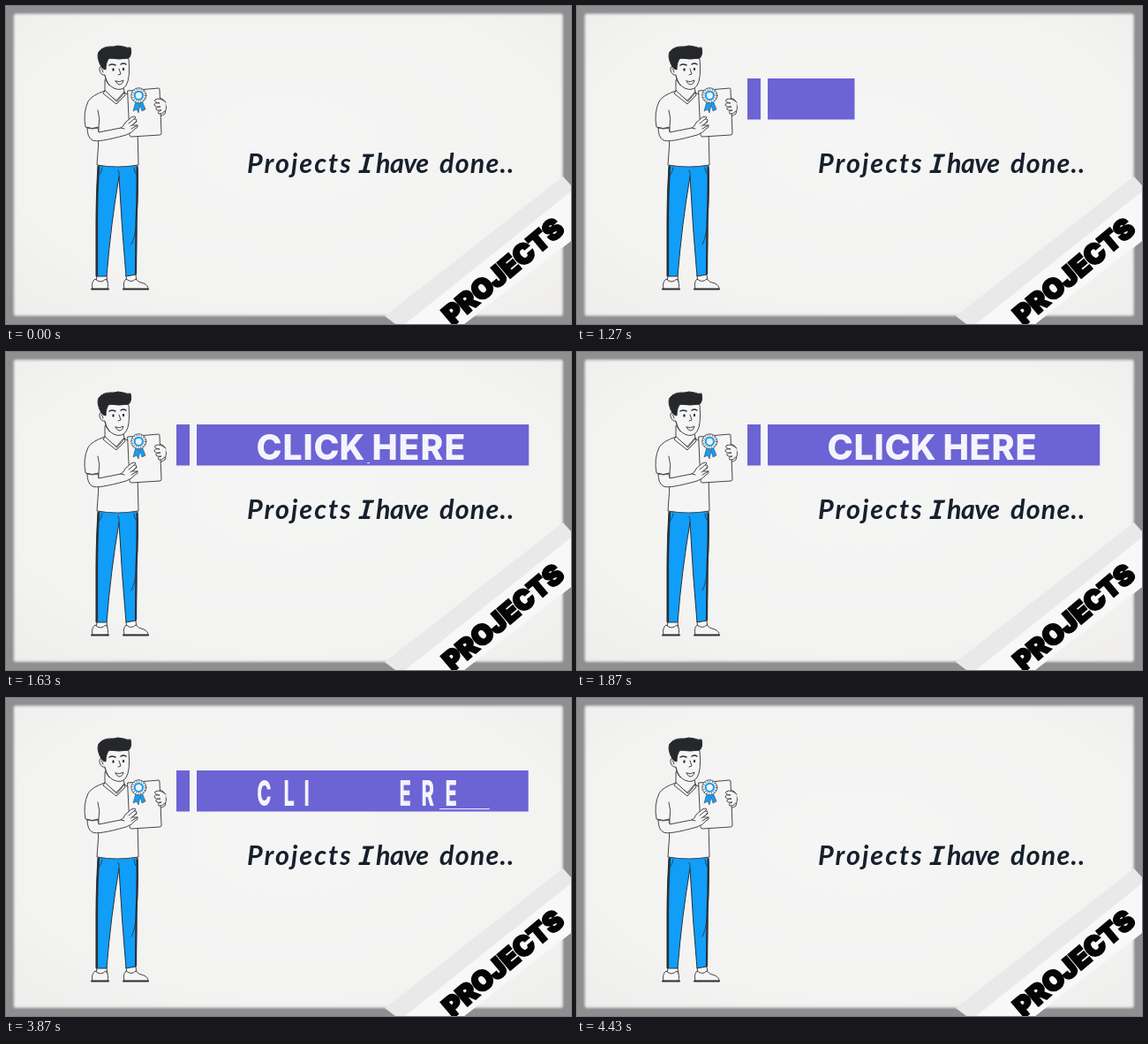
Recreate the animation shown at these times as an HTML page. Size 640 by 360 pixels, loop 5010 ms.

```html
<!DOCTYPE html>
<html lang="en">
<head>
<meta charset="utf-8">
<title>Projects</title>
<style>
html, body { margin: 0; width: 100%; height: 100%; overflow: hidden; background: #8f8f8f; }
svg { display: block; width: 100vw; height: 100vh; }
.ink { fill: none; stroke: #45464a; stroke-width: 1; stroke-linecap: round; stroke-linejoin: round; }
.skin { fill: #f5f5f5; }
.blue { fill: #109ef8; }
.hair { fill: #25272b; }
.dark { stroke: #2c3036; }
.say { font: italic 700 30.5px Lato, "Open Sans", sans-serif; fill: #17202c; }
.say .slab { font: italic 600 30px "Noto Sans Mono", monospace; }
#letters { font: 800 39.5px Inter, "Open Sans", sans-serif; fill: #f5f4fc; }
.sign { font: 900 31px Inter, Lato, sans-serif; fill: #050505; stroke: #050505; stroke-width: 2.2; }
</style>
</head>
<body>
<svg viewBox="0 0 640 360" preserveAspectRatio="none">
  <defs>
    <radialGradient id="paper" cx=".5" cy=".45" r=".75">
      <stop offset="0" stop-color="#f5f5f5"/>
      <stop offset=".7" stop-color="#f3f3f2"/>
      <stop offset="1" stop-color="#efeeed"/>
    </radialGradient>
    <filter id="soft"><feGaussianBlur stdDeviation=".8"/></filter>
    <clipPath id="reveal"><rect id="window" x="193" y="81" width="0" height="48"/></clipPath>
  </defs>

  <rect width="640" height="360" fill="#8f8f8f"/>
  <rect x="9.5" y="9.5" width="620.5" height="340.5" rx="2" fill="url(#paper)" stroke="#dcdddf" stroke-width="2" filter="url(#soft)"/>

  <g class="ink">
    <!-- shoes and ankles -->
    <path class="skin" d="M103 305L102 313H115L114 305ZM136 305L137 313H148L147 304Z"/>
    <path class="skin" d="M98 320Q96 313 101 309Q107 315 113 309Q117 314 115 320ZM134 320Q132 313 136 309Q142 314 147 309Q150 313 156 314Q161 316 161 320Z"/>
    <path class="dark" d="M97 320.5H116M133 320.5H161" stroke-width="2"/>
    <!-- trousers -->
    <g class="dark">
      <path class="blue" d="M104 181Q102 215 102 245Q102 280 102 306L114 306Q119 245 128 193Q131 250 136 306L147 304Q148 265 148 240Q150 207 149 181Z"/>
      <path d="M105 182Q103 215 103 245L103 305M148.5 183Q149 215 147.5 245L147 303" stroke-width="2.2"/>
      <path d="M128 193Q129 189 127 186M109 183Q108 189 105 192M145 183Q145 188 148 191M147 250Q146 262 142 270" stroke-width=".8"/>
    </g>
    <!-- neck and shirt -->
    <path class="skin" d="M112 84L112 97L125 107L134 97L132 87Z"/>
    <path class="skin" d="M112 96Q97 101 93 108Q87 121 90 137Q98 140 105 137Q105 160 103 180Q126 184 150 180L149 140L143 104Q139 100 134 98L126 108Z"/>
    <path d="M112 96L110 99L125 111L135 101L134 97M105 137Q107 127 104 118"/>
    <!-- raised far arm -->
    <path class="skin" d="M170 105Q177 103 180 108Q183 115 180 122Q175 126 170 124Z"/>
    <!-- certificate -->
    <path class="skin" d="M138 96L173 93Q174 93 174 95L176 144Q176 146 174 146L142 148Q140 148 140 146Z"/>
    <path class="skin" d="M181 109Q174 103 169 106Q167 109 174 110Q168 109 168 112Q169 115 175 114Q169 114 170 117Q171 119 176 118Q171 119 173 122Q177 123 180 119"/>
    <!-- near arm and hand -->
    <path class="skin" d="M92 138Q92 149 98 152Q104 155 136 146Q144 143 146 139Q150 138 149 135L143 135L148 130Q148 127 145 128L147 126Q146 124 142 126L135 132Q133 137 130 138L105 143L104 138Q98 140 92 138Z"/>
    <path d="M145 128L139 133M148 131L141 136M149 135L142 139M130 138L134 139"/>
    <!-- head -->
    <path class="skin" d="M110 69Q105 67 106 73Q108 79 112 78Q114 89 122 93Q131 97 136 90Q141 82 139 60Q136 55 113 60Z"/>
    <path d="M112 79Q113 86 117 90M128 71L130 77L127 78M124 85Q129 87 133 84Q132 89 128 89Q125 88 124 85M108 71Q110 73 110 75"/>
    <path class="dark" d="M117 67Q120 65 124 67M130 66Q133 64 136 66" stroke-width="1.5"/>
    <g class="hair" stroke="none">
      <ellipse cx="121.5" cy="72" rx="1.2" ry="1.8"/>
      <ellipse cx="133" cy="71.5" rx="1.1" ry="1.8"/>
    </g>
    <path class="hair dark" d="M108 69Q102 58 105 52Q110 45 122 46Q126 44 133 46Q138 48 141 47Q143 55 139 59Q128 61 117 59Q113 63 113 72L110 71Z"/>
  </g>

  <!-- award rosette -->
  <g class="ink">
    <path class="blue" d="M147 108L144 119L148 117L150 121L152 112L154 119L158 117L154 107Z" stroke-width=".6"/>
    <circle class="skin" cx="150.3" cy="101.3" r="8.6" stroke-width=".8"/>
    <circle cx="150.3" cy="101.3" r="7.2" stroke-width="2.6" stroke-linecap="butt" stroke-dasharray=".6 2.23"/>
    <circle cx="150.3" cy="101.3" r="4.6" fill="#f5f5f5" stroke="#109ef8" stroke-width="2"/>
  </g>

  <g class="say">
    <text x="273" y="189" letter-spacing="2">Projects</text>
    <text class="slab" x="396.5" y="189">I</text>
    <text x="419" y="189" letter-spacing="-.6">have</text>
    <text x="491" y="189" letter-spacing="1.2">done..</text>
  </g>

  <!-- corner ribbon -->
  <path d="M429 351L631 193L640 203V266L519 360H441Z" fill="#e9e9e9"/>
  <path d="M452 360L640 210V266L519 360Z" fill="#f8f8f8"/>
  <text class="sign" transform="translate(506 362.5) rotate(-40)">PROJECTS</text>

  <g clip-path="url(#reveal)">
    <rect x="193" y="82" width="399.5" height="46.5" fill="#6c63d5"/>
    <rect x="208" y="81.5" width="8" height="47.5" fill="#f5f5f5"/>
    <g id="letters"></g>
    <rect id="streak" y="125" height="1.1" fill="#e9e7fb"/>
  </g>
</svg>
<script>
const LOOP = 5010, SWEEP = 760;
const BAR = { width: 399.5, start: 927, end: 3745 };
const TEXT = { start: 1050, end: 3500 };
const WORD = "CLICK HERE";
const LEFT = [285, 316, 339, 350, 380, 410, 417, 447, 472, 499];

const $ = id => document.getElementById(id);
const clamp = v => Math.min(1, Math.max(0, v));
const quint = x => x < .5 ? 16 * x ** 5 : 1 - 16 * (1 - x) ** 5;
const ease = (t, start) => quint(clamp((t - start) / SWEEP));

const letters = [...WORD].map((char, i) => {
  const el = document.createElementNS("http://www.w3.org/2000/svg", "text");
  el.textContent = char;
  $("letters").append(el);
  // letters switch from the middle of the phrase outwards
  const step = i < 5 ? 4 - i : i - 5;
  const bearing = char === "C" ? 1.5 : 2.5;
  return { el, x: LEFT[i], bearing, delay: 300 + 35 * step };
});

function draw(t) {
  const width = BAR.width * (ease(t, BAR.start) - ease(t, BAR.end));
  $("window").setAttribute("width", width < .25 ? 0 : Math.max(.7, width));

  const leaving = t >= TEXT.end;
  const from = leaving ? TEXT.end : TEXT.start;
  const q = ease(t, from);
  const scale = Math.max(.001, leaving ? 1 - q : q);
  for (const { el, x, bearing, delay } of letters) {
    const shown = clamp((t - from - delay) / 35);
    el.setAttribute("opacity", leaving ? 1 - shown : shown);
    el.setAttribute("transform", `translate(${x} 122) scale(${scale} 1) translate(${-bearing} 0)`);
  }
  $("streak").setAttribute("x", 557.5 - 150 * q);
  $("streak").setAttribute("width", 230 * q * (1 - q));
}

function tick() {
  draw(performance.now() % LOOP);
  requestAnimationFrame(tick);
}
tick();
</script>
</body>
</html>
```
